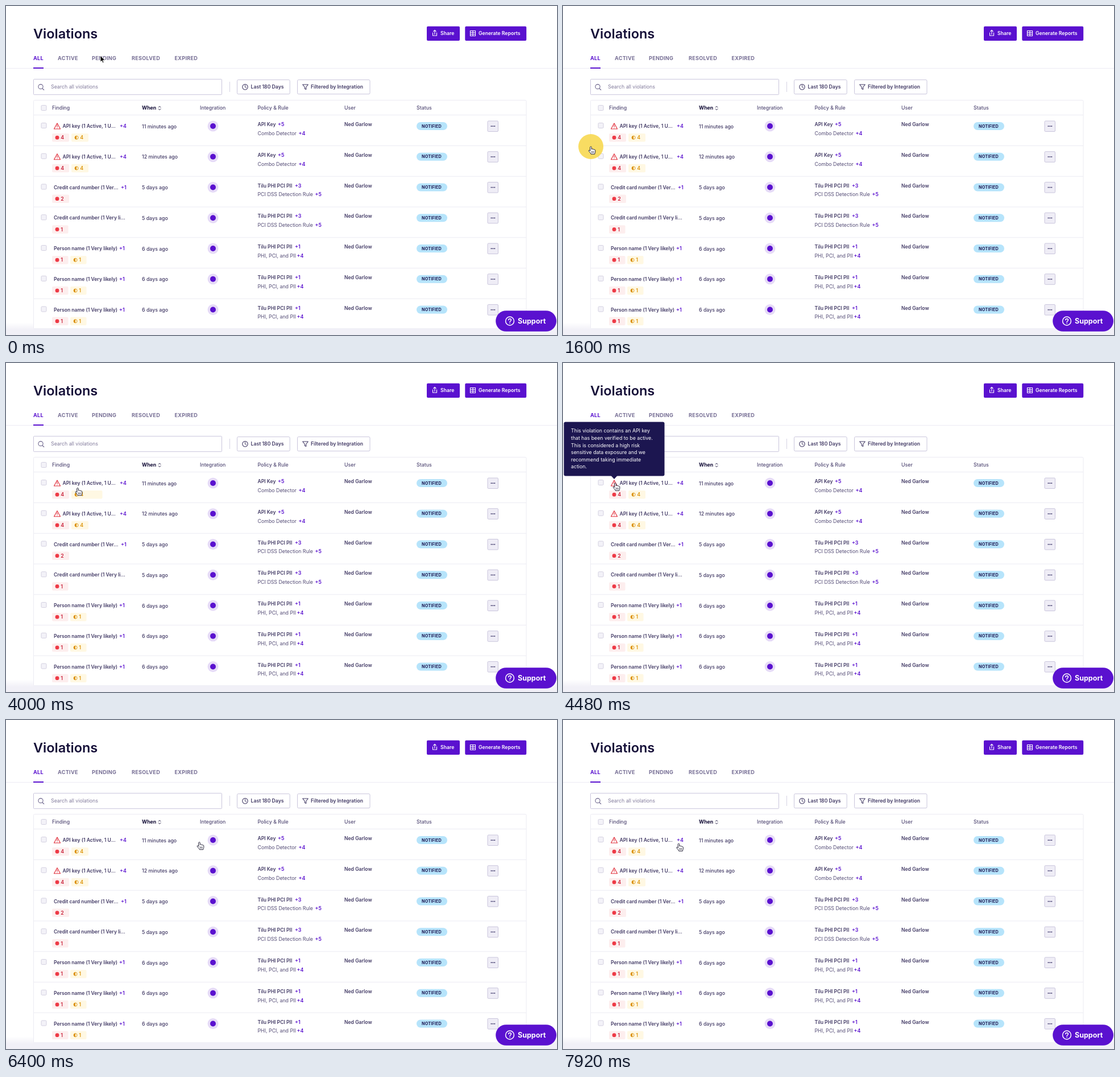
Animation, 969 px wide and 578 px high, one loop 8 s. Source, as an HTML page:

```html
<!DOCTYPE html>
<html lang="en">
<head>
<meta charset="utf-8">
<title>Violations</title>
<style>
html, body { margin: 0; width: 100%; height: 100%; overflow: hidden; background: #fff; }
svg { display: block; width: 969px; height: 578px; font-family: Inter, "Open Sans", sans-serif; }
text { white-space: pre; }
</style>
</head>
<body>
<svg id="stage" viewBox="0 0 969 578" xmlns="http://www.w3.org/2000/svg"></svg>
<script>
const LOOP = 8000, STEP = 80, ROW = 53.75;
const PURPLE = '#5a11cf', INK = '#433b66', SOFT = '#544c76', DARK = '#1c1650', BLACK = '#150f38';
const LINE = '#ecebf3', EDGE = '#c9c5dc', FLOOR = '#f1f0f7';
const stage = document.getElementById('stage');

const text = (x, y, s, { size = 8.8, weight = 400, fill = INK, space = 0, extra = '' } = {}) =>
  `<text x="${x}" y="${y}" font-size="${size}" font-weight="${weight}" fill="${fill}" letter-spacing="${space}" ${extra}>${s}</text>`;
const rect = (x, y, w, h, fill, r = 0, stroke = 'none') =>
  `<rect x="${x}" y="${y}" width="${w}" height="${h}" rx="${r}" fill="${fill}" stroke="${stroke}"/>`;
const path = (d, stroke, width = 1, fill = 'none') =>
  `<path d="${d}" stroke="${stroke}" stroke-width="${width}" fill="${fill}" stroke-linecap="round" stroke-linejoin="round"/>`;
const circle = (x, y, r, fill, stroke = 'none', width = 1) =>
  `<circle cx="${x}" cy="${y}" r="${r}" fill="${fill}" stroke="${stroke}" stroke-width="${width}"/>`;
const group = (x, y, body, id = '') => `<g id="${id}" transform="translate(${x} ${y})">${body}</g>`;
const more = (x, y, n) => text(x, y, '+' + n, { weight: 600, fill: PURPLE });

function header() {
  const tabs = [[48, 'ALL'], [91, 'ACTIVE'], [151, 'PENDING'], [221, 'RESOLVED'], [296.5, 'EXPIRED']];
  const button = { weight: 600, fill: '#fff', size: 8.7 };
  return text(48, 56.5, 'Violations', { size: 23.5, weight: 600, fill: BLACK }) +
    rect(740, 35.7, 58, 25.3, PURPLE, 2) +
    path('M750.5 47v5h7v-5M754 49.500v-7M751.700 44.700l2.300-2.300l2.300 2.300', '#fff', 1.1) +
    text(764, 51.2, 'Share', button) +
    rect(807.3, 35.7, 107.9, 25.3, PURPLE, 2) +
    path('M816.500 43.500h9v9h-9zM816.500 46.500h9M816.500 49.500h9M821 43.500v9', '#fff', 1.1) +
    text(831, 51.2, 'Generate Reports', button) +
    tabs.map(([x, s], i) => text(x, 95.4, s,
      { size: 9.1, weight: 700, space: 0.28, fill: i ? '#776f95' : PURPLE })).join('') +
    rect(0, 109, 969, 1, LINE) + rect(48, 108, 18, 2, PURPLE);
}

function filters() {
  return rect(48.5, 128.7, 331, 27, '#fff', 1, EDGE) +
    circle(61, 141.7, 4.1, 'none', '#6a628a', 1.1) + path('M64 144.800l2.700 2.700', '#6a628a', 1.1) +
    text(79, 145.3, 'Search all violations', { fill: '#827b9c' }) +
    rect(393, 133, 1, 18, '#d6d3e3') +
    rect(406.5, 129.7, 92.7, 25, '#fff', 2, EDGE) +
    circle(420.5, 142.3, 4.7, 'none', INK, 1.1) + path('M420.500 139.500v3l2 1.200', INK, 1) +
    text(430.5, 145.3, 'Last 180 Days', { weight: 600, size: 8.7 }) +
    rect(512.5, 129.7, 127.5, 25, '#fff', 2, EDGE) +
    path('M521.700 138h9.600l-3.600 4.500v4l-2.400-1.200v-2.800z', INK, 1.1) +
    text(536, 145.3, 'Filtered by Integration', { weight: 600, size: 8.7 });
}

const checkbox = y => rect(62, y - 4.5, 9, 9, '#f3f2f8', 1.5, '#d3d0e0');

function badge(id, x, y, hot, n, label = '') {
  const ink = hot ? '#c91f37' : '#dc9309', dot = hot ? '#ee3a46' : '#dc9309';
  const icon = hot ? circle(9, 0, 3.4, dot) :
    circle(9, 0, 3, 'none', dot, 0.9) + `<path d="M9 -3a3 3 0 0 0 0 6z" fill="${dot}"/>`;
  return group(x, y, rect(0, -7.2, n > 1 ? 30 : 28.5, 14.4, hot ? '#fdeeee' : '#fff8e3', 2) + icon +
    text(15.3, 3.2, n, { weight: 600, fill: ink }) +
    (label && text(24, 3.2, label, { weight: 600, fill: ink, size: 8.7, extra: 'class="label"' })), id);
}

function row(r, i) {
  const strong = { weight: 600, size: 8.6 };
  const alert = r.alert ?
    path('M90 206l5.500 10h-11z', '#e1323e', 1.2) + path('M90 209.600v2.800M90 214.200v.1', '#e1323e', 1.1) : '';
  const dots = [853.5, 856.4, 859.3].map(x => circle(x, 211.2, 0.9, DARK)).join('');
  return group(0, ROW * i,
    checkbox(210) + alert +
    text(r.alert ? 99.5 : 84, 214.2, r.find, strong) + (r.findMore ? more(...r.findMore) : '') +
    badge('red' + i, 81, 231.2, true, r.red, i ? '' : 'Very Likely') +
    (r.amber ? badge('amber' + i, r.amber > 1 ? 115 : 113, 231.2, false, r.amber, i ? '' : 'Likely') : '') +
    text(239, 214.6, r.when, { weight: 500 }) +
    circle(364, 211, 9.5, '#e6dbf7') + circle(364, 211, 5, PURPLE) +
    text(442.5, 211, r.policy, strong) + more(r.px, 211, r.pn) +
    text(442.5, 226.8, r.rule, { fill: SOFT }) + more(r.rx, 226.8, r.rn) +
    text(595, 211, 'Ned Garlow', strong) +
    rect(722, 204, 54, 14, '#b6e4fb', 7) +
    text(731, 213.6, 'NOTIFIED', { size: 7.2, weight: 700, fill: DARK, space: 0.2 }) +
    rect(847, 202, 18.5, 18.5, '#efedf6', 1.5, EDGE) + dots +
    rect(48, 245, 867, 1, LINE));
}

function table() {
  const key = { alert: true, find: 'API key (1 Active, 1 U...', findMore: [200, 214.2, 4], red: 4, amber: 4,
    policy: 'API Key', px: 478, pn: 5, rule: 'Combo Detector', rx: 514.5, rn: 4 };
  const card = { policy: 'Tilu PHI PCI PII', px: 508, pn: 3, rule: 'PCI DSS Detection Rule', rx: 543.5, rn: 5,
    when: '5 days ago' };
  const person = { find: 'Person name (1 Very likely)', findMore: [199, 214.2, 1], red: 1, amber: 1,
    policy: 'Tilu PHI PCI PII', px: 508, pn: 1, rule: 'PHI, PCI, and PII', rx: 511.5, rn: 4, when: '6 days ago' };
  const rows = [
    { ...key, when: '11 minutes ago' },
    { ...key, when: '12 minutes ago' },
    { ...card, find: 'Credit card number (1 Ver...', findMore: [202, 214.2, 1], red: 2 },
    { ...card, find: 'Credit card number (1 Very li...', red: 1 },
    person, person, person
  ];
  const heads = [[81, 'Finding'], [341, 'Integration'], [442.5, 'Policy &amp; Rule'], [595, 'User'], [722, 'Status']];
  return rect(48.5, 165.5, 866.5, 420, '#fff', 2, LINE) + rect(48, 191, 867, 1, LINE) + checkbox(179) +
    heads.map(([x, s]) => text(x, 181.8, s, { weight: 500, fill: SOFT })).join('') +
    text(239, 181.8, 'When', { weight: 700, fill: BLACK }) +
    path('M268.300 178l1.800-1.800l1.800 1.800M268.300 180.800l1.800 1.800l1.800-1.800', BLACK, 1) +
    rows.map(row).join('');
}

function footer() {
  return `<defs><linearGradient id="shade" x2="0" y2="1">
    <stop offset="0" stop-color="${FLOOR}" stop-opacity="0"/><stop offset="0.6" stop-color="${FLOOR}"/></linearGradient></defs>` +
    rect(0, 556, 48, 22, 'url(#shade)') + rect(915.5, 556, 54, 22, 'url(#shade)') +
    rect(48, 566, 867.5, 12, FLOOR) +
    rect(861.2, 535.2, 106.8, 36.6, PURPLE, 18.3) +
    circle(886, 553.5, 7.4, 'none', '#fff', 1.5) +
    path('M883.800 551.800c0-3 4.600-3 4.600 0c0 1.700-2.300 1.700-2.300 3.400M886.100 557.300v.1', '#fff', 1.5) +
    text(900, 558, 'Support', { size: 12.5, weight: 700, fill: '#fff' });
}

function tooltip() {
  const lines = ['This violation contains an API key', 'that has been verified to be active.',
    'This is considered a high risk', 'sensitive data exposure and we', 'recommend taking immediate', 'action.'];
  return `<g id="tip">${rect(1.5, 103.5, 177, 95, DARK, 3)}<path d="M84.500 198h11l-5.500 6z" fill="${DARK}"/>` +
    lines.map((s, i) => text(14, 122.2 + 12.65 * i, s, { fill: '#fff' })).join('') + '</g>';
}

function pointers() {
  const hand = 'M-1.4 1.2C-1.4 -.5 1.2 -.5 1.2 1.2V4.6C1.5 3.600 3.400 3.700 3.600 5C4 4.200 5.700 4.400 5.800 5.600' +
    'C6.300 5 7.800 5.300 7.800 6.600V9C7.800 11 6.800 11.500 6.800 13.200H.2C0 11.600 -1.8 10.400 -3.600 7.800C-4.400 6.600 -3 5.800 -2.200 6.600L-1.4 7.400Z';
  const beam = 'M-2 -6C-.7 -6 0 -5.500 0 -4.600C0 -5.500 .7 -6 2 -6M0 -4.600V4.600M-2 6C-.7 6 0 5.500 0 4.600C0 5.500 .7 6 2 6M-1.300 1.500H1.300';
  return circle(49, 247, 22, '#f8da55').replace('<circle', '<circle id="click"') +
    group(0, 0, path('M0 0V10.800L2.500 8.500L4.200 12.400L6 11.600L4.300 7.900H7.700Z', '#fff', 0.8, '#000'), 'arrow') +
    group(0, 0, path(hand, '#17152b', 0.95, '#fff') + path('M1.300 8.300v2.700M3.200 8.300v2.700M5.100 8.300v2.700', '#17152b', 0.7), 'hand') +
    group(0, 0, path(beam, '#fff', 1.9) + path(beam, '#16131f', 1), 'beam');
}

stage.innerHTML = header() + filters() + table() + tooltip() + footer() + pointers();

const $ = id => document.getElementById(id);
const red = $('red0'), amber = $('amber0');
const clamp = v => Math.max(0, Math.min(1, v));
const ease = v => v * v * (3 - 2 * v);
const ramp = (t, from, span) => ease(clamp((t - from) / span));
const during = (t, from, to, rise, fall) => ramp(t, from, rise) * (1 - ramp(t, to, fall));

// time, x, y of the pointer tip
const route = [
  [0, 166, 87.5], [880, 19, 236], [1360, 19, 236], [1600, 49, 247], [1760, 49, 247], [2080, 98, 235],
  [2160, 98, 235], [2640, 126, 233], [2880, 126, 233], [3200, 162, 231], [3760, 162, 231], [4000, 126, 219.5],
  [4240, 92, 211], [5200, 92, 211], [5680, 126, 135], [5840, 136, 142], [6400, 340, 214.5],
  [6880, 470, 216], [7040, 470, 216], [7840, 206, 216], [7920, 203.5, 217], [8000, 203.5, 217]
];

function locate(t) {
  const i = route.findIndex(p => p[0] > t);
  const [t0, x0, y0] = route[i - 1], [t1, x1, y1] = route[i];
  const k = ease((t - t0) / (t1 - t0));
  return [x0 + (x1 - x0) * k, y0 + (y1 - y0) * k];
}

function showLabel(el, on) {
  el.querySelector('.label').setAttribute('opacity', on ? 1 : 0);
}

function draw(time) {
  const t = Math.floor((time % LOOP) / STEP) * STEP;
  const [x, y] = locate(t);

  const wideRed = during(t, 2000, 3120, 240, 160), wideAmber = during(t, 3120, 4000, 240, 160);
  red.firstChild.setAttribute('width', 30 + 46.5 * wideRed);
  amber.firstChild.setAttribute('width', 30 + 24.5 * wideAmber);
  amber.setAttribute('transform', `translate(${115 + 46.5 * wideRed} 231.2)`);
  showLabel(red, t >= 2160 && t < 3120);
  showLabel(amber, t >= 3280 && t < 3920);

  const tip = during(t, 4240, 5920, 160, 160);
  $('tip').setAttribute('opacity', tip);

  $('click').setAttribute('r', 12 + 10 * ramp(t, 1440, 160));
  $('click').setAttribute('opacity', 0.92 * during(t, 1440, 1680, 160, 160));

  const inTip = tip > 0.5 && x < 178 && y > 104 && y < 198;
  const shape = inTip ? 'beam' : x > 48 && y > 192 ? 'hand' : 'arrow';
  for (const id of ['arrow', 'hand', 'beam']) {
    $(id).setAttribute('transform', `translate(${x} ${y})`);
    $(id).setAttribute('visibility', id === shape ? 'visible' : 'hidden');
  }
}

const start = performance.now();
function tick() {
  draw(performance.now() - start);
  requestAnimationFrame(tick);
}
tick();
</script>
</body>
</html>
```
